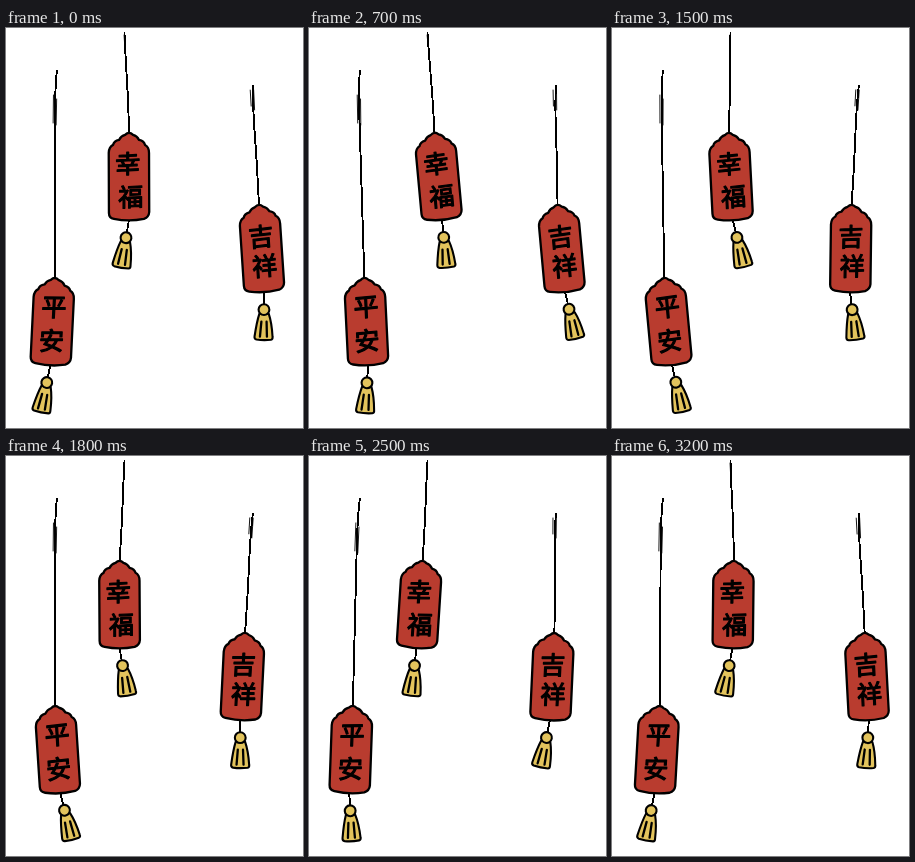
Animation, 297 px wide and 400 px high, one loop 3300 ms. Source, as an HTML page:

```html
<!DOCTYPE html>
<html lang="zh">
<head>
<meta charset="utf-8">
<style>
html, body { margin: 0; width: 100%; height: 100%; overflow: hidden; background: #fff; }
svg { display: block; width: 100%; height: 100%; }
path, circle { fill: none; stroke: #000; stroke-width: 2.3; stroke-linecap: round; stroke-linejoin: round; }
.string { stroke-width: 1.9; shape-rendering: crispEdges; }
.wisp { stroke-width: .9; shape-rendering: crispEdges; }
.red { fill: #b93c2f; }
.gold { fill: #e2c35c; stroke-width: 2.1; }
text {
  font: 25px "Noto Sans CJK TC", "Noto Sans CJK SC", "Noto Sans CJK", sans-serif;
  text-anchor: middle; stroke: #000; stroke-width: 1.2; stroke-linejoin: round;
}
</style>
</head>
<body>
<svg id="stage" viewBox="0 0 297 400"></svg>
<script>
const LOOP = 3300, STEP = 100, TAG = 87;

// x, y: hanging point; len: string length; mid, amp: sideways swing of its lower end; lag in ms
// cols, rows: centre of each character on the tag
const charms = [
  { x: 50, y: 43, len: 207, mid: -.2, amp: 6, lag: 75, word: '平安', cols: [.5, 0], rows: [29, 63],
    string: 'M.8 0Q-1 18 -.8 50T0 207', wisp: 'M-2.4 24L-2.6 52M.8 28L.4 54' },
  { x: 119, y: 5, len: 100, mid: 0, amp: 7, lag: -325, word: '幸福', cols: [-1.2, 1.8], rows: [31, 64],
    string: 'M-.5 0Q-.5 20 0 45T0 100', wisp: 'M-1 2L-.8 12' },
  { x: 246, y: 58, len: 119, mid: 0, amp: 7, lag: -755, word: '吉祥', cols: [0, 1.8], rows: [32, 61.5],
    string: 'M.8 0Q-.5 20 0 50T0 119', wisp: 'M-2 4L-2 20M1.4 4L1.2 24' }
];

const tagPath = 'M-4 2Q-2 0 0 0Q2 0 4 2Q8 3 10 7Q15 8 16 12Q20 14 20 20L20.3 79Q20 84 15 86' +
  'Q0 89 -15 86Q-20 85 -20 80L-20.3 20Q-20 14 -16 12Q-15 8 -10 7Q-8 3 -4 2Z';

const tassel = `
  <path class="string" d="M0 0V14"/>
  <path class="gold" d="M-4.5 22Q-7 30 -9 45Q-9.3 47.5 -7 48Q0 49 7.5 48Q9.5 47.5 9 45Q8 31 4.8 22Z"/>
  <path d="M-2.4 30L-3.6 45M2.8 30L3.4 45"/>
  <circle class="gold" cy="18" r="5.4"/>`;

const glyph = (c, i) =>
  `<text transform="translate(${c.cols[i]} ${c.rows[i] + 9.2}) skewY(-3)">${c.word[i]}</text>`;

const charmMarkup = c => `<g>
  <path class="string" d="${c.string}"/><path class="wisp" d="${c.wisp}"/>
  </g><g>${tassel}</g><g>
  <path class="red" d="${tagPath}"/>${glyph(c, 0)}${glyph(c, 1)}
  </g>`;

stage.innerHTML = charms.map(charmMarkup).join('');
const groups = [...stage.querySelectorAll('g')];

// Places a part and returns the point where the next one hangs
function hang(g, [x, y], len, dx) {
  const a = Math.asin(dx / len);
  g.setAttribute('transform', `translate(${x} ${y}) rotate(${-a * 180 / Math.PI})`);
  return [x + dx, y + len * Math.cos(a)];
}

function draw(now) {
  const t = Math.floor(now / STEP) * STEP % LOOP;
  charms.forEach((c, i) => {
    const wave = lag => Math.sin(2 * Math.PI * (t - c.lag - lag) / LOOP);
    const [string, fringe, tag] = groups.slice(i * 3, i * 3 + 3);
    let p = hang(string, [c.x, c.y], c.len, c.mid + c.amp * wave(0));
    p = hang(tag, p, TAG, 1 + 7.1 * wave(410));
    hang(fringe, p, 48, 1 + 10.5 * wave(845));
  });
}

const start = performance.now();
function tick() {
  draw(performance.now() - start);
  requestAnimationFrame(tick);
}
tick();
</script>
</body>
</html>
```
